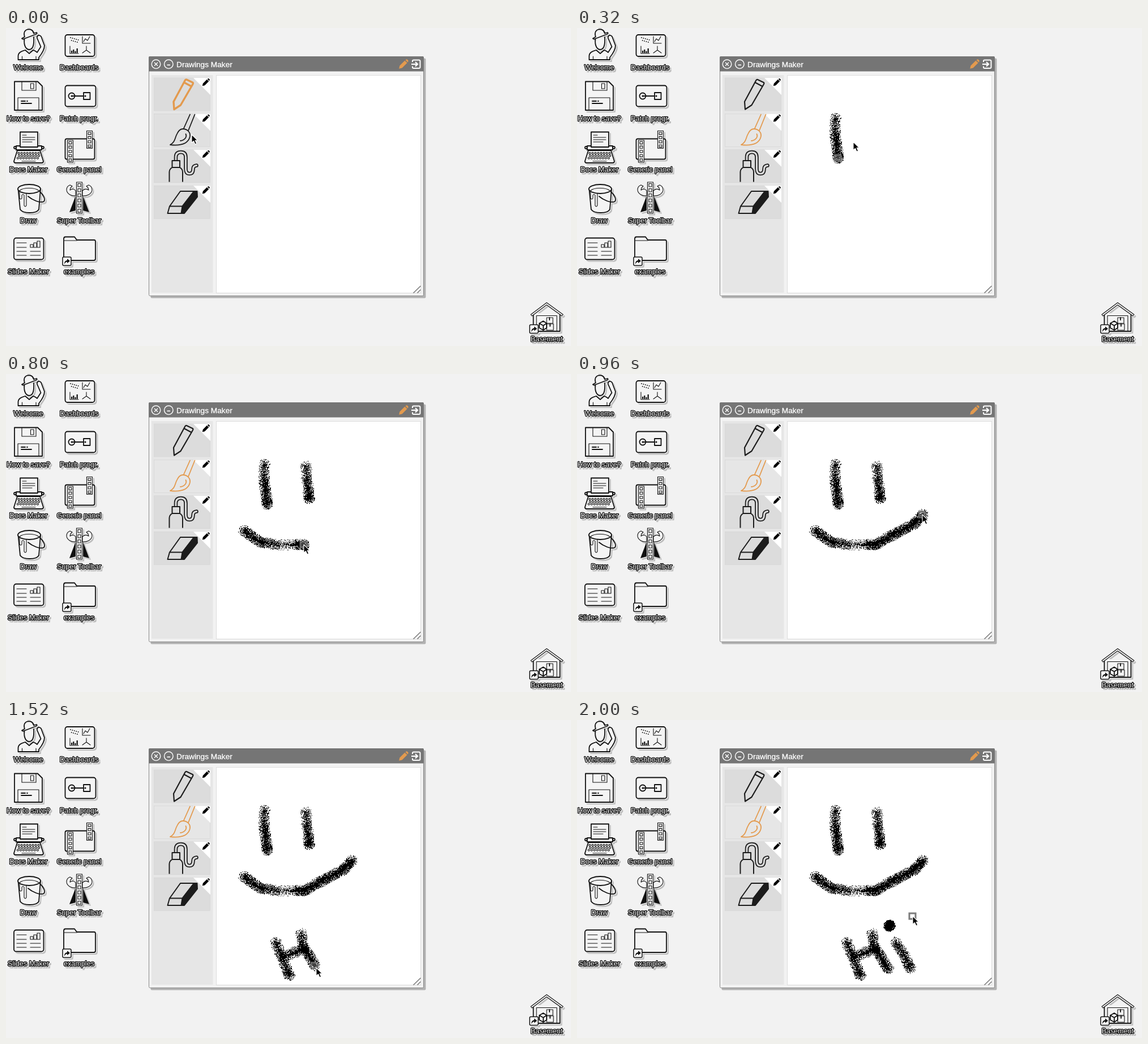
Recreate the animation shown at these times as an HTML page with a canvas. Size 998 by 561 pixels, loop 2080 ms.

```html
<!DOCTYPE html>
<html lang="en">
<head>
<meta charset="utf-8">
<title>Drawings Maker</title>
<style>
  html, body { margin: 0; width: 100%; height: 100%; overflow: hidden; background: #f2f2f2; }
  svg, canvas { position: absolute; left: 0; top: 0; width: 998px; height: 561px; }
  text { font-family: "Liberation Sans", Arial, Helvetica, sans-serif; }
  .icon { fill: none; stroke: #111; stroke-width: 1.8; stroke-linejoin: round; stroke-linecap: round;
          filter: drop-shadow(1px 1px 0 #fafafa) drop-shadow(2px 2px .5px #bdbdbd); }
  .icon .paper { fill: #f4f4f4; }
  .icon .thin { stroke-width: 1.1; }
  .icon .solid { fill: #111; stroke: none; }
  .icon text { font-size: 12.6px; text-anchor: middle; fill: #fff; stroke: #000; stroke-width: 2.4; paint-order: stroke; }
  .tool { fill: none; stroke: #1c1c1c; stroke-width: 2; stroke-linejoin: round; stroke-linecap: round; }
</style>
</head>
<body>
<svg viewBox="0 0 998 561">
  <defs>
    <g id="shortcut">
      <rect width="15" height="15" rx="2" fill="#f8f8f8" stroke="#111" stroke-width="1.5"/>
      <path fill="#111" stroke="none" d="M3 13C3 8 5 6 8 6V3L13 7L8 11V8.500C6 8.500 4 10 3 13Z"/>
    </g>
    <path id="pen" d="M-6.500 6.500L-5.500 2L2-5.500L5.500-2L-2 5.500ZM3-6.300L4.300-7.300Q5.300-7.600 6.600-6.300Q7.800-5 7-4L6.200-3Z"/>
    <path id="hose" d="M300 236V228Q300 219 309 219Q317.500 219 317.500 228V248Q317.500 257 324 257Q330.500 257 330.500 249Q330.500 243 336.500 242.500"/>
  </defs>
  <g id="desktop"></g>

  <g id="window">
    <rect x="255.500" y="53.500" width="486" height="423" rx="2" fill="#b2b2b2"/>
    <rect x="252.500" y="50.500" width="485" height="422" rx="2" fill="#f2f2f2" stroke="#8a8a8a"/>
    <path d="M252 76.500V52Q252 50 254 50H736Q738 50 738 52V76.500Z" fill="#757575"/>
    <g fill="none" stroke="#fff" stroke-width="1.400">
      <circle cx="265" cy="63.800" r="7.800"/>
      <path d="M262 60.800L268 66.800M268 60.800L262 66.800"/>
      <circle cx="287.300" cy="63.800" r="7.800"/>
      <path d="M284.500 65.300H290" stroke-width="1.700"/>
      <path d="M718 60V58.500Q718 56.500 720 56.500H729.500Q731.500 56.500 731.500 58.500V69Q731.500 71 729.500 71H720Q718 71 718 69V67.500" stroke-width="2"/>
      <path d="M716 63.800H726M723 60L727 63.800L723 67.600" stroke-width="2.200"/>
    </g>
    <use href="#pen" transform="translate(702 64) scale(1.200)" fill="#e39a4e"/>
    <text x="301" y="69" font-size="13.700" fill="#fff" stroke="#fff" stroke-width=".3">Drawings Maker</text>
    <rect x="257" y="83" width="108.500" height="384" fill="#e6e6e6"/>
    <rect x="371.500" y="83.500" width="361" height="384" fill="#fff" stroke="#dcdcdc"/>
    <path d="M719.500 467.500L732.500 455M726.500 467.500L732.500 461.500" stroke="#777" stroke-width="1.500"/>
  </g>
  <g id="tools"></g>

  <g class="tool" id="pencil">
    <path d="M319 91L329.500 96Q331 97 330 99L308.500 136L297 143.500L296 130L316.500 92Q317.500 90.500 319 91ZM314.500 96L327.500 103"/>
  </g>
  <g class="tool" id="brush" style="stroke-width:1.800">
    <path d="M325 152.500L314 177M333.500 152.500L322 181"/>
    <path d="M312 178C321 178 327 185 324.500 193C321 204 308 208 290 206C298 202 298 196 301 189C304 182 307 178 312 178ZM308 199C316 198 320 192 317.500 187"/>
  </g>
  <g class="tool">
    <use href="#hose" stroke-width="6.500"/>
    <use href="#hose" stroke="#dcdcdc" stroke-width="3"/>
    <path d="M288.500 271.500V254Q288.500 249 293.500 246V234H307V246Q312 249 312 254V271.500M293.500 246H307" fill="#dcdcdc" stroke-linecap="butt"/>
  </g>
  <g class="tool">
    <path d="M308 288H332L311.500 314.500H289ZM289 314.500L285.500 327H309.500"/>
    <path d="M332 288H337.500L338 298L315 327H309.500L311.500 314.500Z" fill="#1c1c1c"/>
  </g>
</svg>
<canvas id="ink" width="998" height="561"></canvas>
<svg viewBox="0 0 998 561">
  <rect id="marker" x="-6" y="-5" width="11" height="10" fill="rgba(255,255,255,.25)" stroke="#6e6e6e" stroke-opacity=".9" stroke-width="3"/>
  <path id="cursor" d="M0 0V14.500L3.500 11.300L6 17L8.600 15.900L6.200 10.300H10.500Z" fill="#000" stroke="#fff" stroke-width="1.100" stroke-linejoin="round"/>
</svg>
<script>
const $ = id => document.getElementById(id);
const STEP = 80, STEPS = 26;

// Static desktop
const rect = (x, y, w, h, cls = "paper", r = 0) =>
  `<rect x="${x}" y="${y}" width="${w}" height="${h}" rx="${r}" class="${cls}"/>`;
const path = (d, cls = "") => `<path d="${d}" class="${cls}"/>`;
const dot = (x, y, r, cls = "solid") => `<circle cx="${x}" cy="${y}" r="${r}" class="${cls}"/>`;
const shortcut = (x, y) => `<use href="#shortcut" x="${x}" y="${y}"/>`;
const range = (n, make) => Array.from({ length: n }, (_, i) => make(i)).join("");
const strip = (x, y, n, step) => rect(x, y, 10, n * step + 1, "paper thin") +
  range(n, i => rect(x + 2.5, y + 2.5 + i * step, 5, step - 3.5, "thin"));

function icon(label, x, y, art) {
  $("desktop").innerHTML += `<g class="icon">${art}<text x="${x}" y="${y}">${label}</text></g>`;
}

icon("Welcome", 39.5, 74,
  path("M21.500 56V49C22 43 27 41 34 39L41 45L48 39C51 40 53 41 55 43L61.500 33L55 18C54 13 59 11 62 15L68 31C68 38 62 47 58 52V56Z", "paper") +
  path("M32.500 20C31 32 36 38 41 38C47 38 50 31 49 16", "paper") +
  path("M28 18.500C29 20 31 20 32 19L53 11C55 10 55 9 54 8L49 9.500C48 3.500 43 1.500 38 2.500C32 4.500 31 9.500 33 15.500Z", "paper") +
  path("M28.500 50V56M53 50V56", "thin"));
icon("Dashboards", 129, 74,
  rect(104.5, 12, 52, 38, "paper", 4) +
  range(9, i => dot(114 + i * 1.7, 17 + (i * 5) % 9, .9)) +
  path("M135 15V27H149M137 24L140 19L144 22L148 15M113 32V45H128M142 32V39L135 44M142 39L149 44", "thin") +
  range(4, i => rect(115 + i * 3.2, 40 - [0, 2, -1, 4][i], 2.2, 4 + [0, 2, -1, 4][i], "solid")));
icon("How to save?", 39.5, 164,
  path("M15 94.500H56L64 102.500V145H15Z", "paper") +
  path("M28 95V110H53V95", "thin") + rect(43.5, 98, 5.5, 9, "thin") +
  path("M21 145V123H58V145", "thin") +
  path("M27 129H34M37 129H38M27 133H45"));
icon("Patch progr.", 129, 164,
  rect(104.5, 101.5, 54, 37, "paper", 4) + dot(116, 120, 5.5, "") + dot(116, 120, 1.5) +
  path("M117 120H137") + rect(137, 114, 11.5, 12, "") + dot(140, 120, 1.5));
icon("Docs Maker", 39.5, 254,
  path("M18 208H63V215H18Z", "paper") + dot(16, 211, 2, "") + dot(65, 211, 2, "") +
  path("M25 210V183.500H56V210Z", "paper") +
  path("M29 189H36M29 193H51M29 197H51M29 201H46", "thin") +
  path("M20 216H60L66 235Q66 238 63 238H17Q14 238 14 235Z", "paper") +
  range(3, r => range(8, i => dot(22.5 + i * 5 - r * .8 + (r === 1 ? 1.5 : 0), 221 + r * 4.3, 1.6, "thin"))) +
  path("M28 235H52", "thin"));
icon("Generic panel", 129, 254,
  rect(104.5, 195.5, 52, 36, "paper", 3) + strip(108.5, 198, 5, 7.6) + strip(142.5, 181.5, 4, 7.4));
icon("Draw", 39.5, 344,
  path("M21.500 284L25 320C30 328 54 328 58 320L61 284", "paper") +
  `<ellipse cx="41" cy="284" rx="20" ry="8" class="paper"/>` +
  path("M24 287C30 281 51 281 58 287M24 288V300Q26 304 28 300V295Q30 292 32 295V313Q34 317 36 313V292", "thin") +
  path("M60 289C66 294 70 302 67 306C61 310 46 303 39 297"));
icon("Super Toolbar", 129, 344,
  path("M123 296L112 325L123 322ZM136 296L147 325L136 322Z", "solid") +
  path("M123 296C116 297 108 293 107 286C107 281 110 278 113 277L117 279L114 282L113 286C117 283 121 284 123 287ZM135 296C143 297 151 293 152 286C152 281 149 278 146 277L142 279L145 282L146 286C142 283 138 284 135 287Z", "paper thin") +
  strip(124.5, 272, 6, 9));
icon("Slides Maker", 39.5, 434,
  rect(14, 370.5, 52.5, 38, "paper", 4) +
  path("M19 379H36M19 387H36M19 394H36M19 401H36M43 394H61M43 401H61", "thin") +
  range(3, i => rect(43 + i * 6, 382 - i * 3, 5, 5 + i * 3, "thin")));
icon("examples", 129, 434,
  path("M102 408V372Q102 368.500 105 368.500H121L125 374H156Q158 374 158 377V407Q158 410 155 410H104Q102 410 102 408Z", "paper") +
  path("M103 375H125", "thin") + shortcut(100, 404));
icon("Basement", 955, 553,
  path("M931.500 503V535H978.500V503", "paper") +
  path("M927 505.500L955 484.500L984 505.500L982 508L955 488.500L929 508Z", "paper thin") +
  path("M937 534V507.500H973V534", "thin") +
  rect(955, 511, 11, 10, "paper thin") + rect(955, 522, 12, 11, "paper thin") +
  path("M942 521L949 517L955 521V529L949 533L942 529ZM942 521L949 525L955 521M949 525V533M960 511V515M961 522V526") +
  shortcut(925, 523.5));

$("tools").innerHTML = range(4, i => {
  const y = 88 + i * 63.4;
  return `<rect id="tool${i}" x="261.500" y="${y}" width="99" height="58" fill="#dcdcdc" stroke="#d2d2d2" stroke-width=".6"/>
    <path d="M331 ${y}H361V${y + 30}Z" fill="#fff"/>
    <use href="#pen" transform="translate(353 ${y + 8}) scale(.950)"/>`;
});

// Spray strokes: points are [x, y, dots left where the hand slows down]
const strokes = [
  { from: 2, to: 3, points: [[456, 159, 130], [455, 173, 40], [456, 190, 180], [459, 211, 150], [461, 229, 320]] },
  { from: 5, to: 7, points: [[530, 162, 110], [531, 185, 130], [534, 206, 130], [535, 219, 300]] },
  { from: 9, to: 12, points: [[420, 276, 210], [449, 296, 250], [480, 301, 50], [506, 300, 40], [526, 301, 280], [560, 282, 220], [595, 264, 240], [610, 248, 280]] },
  { from: 14, to: 15, points: [[476, 392, 130], [484, 411, 110], [492, 430, 90], [500, 450, 260]] },
  { from: 16, to: 17, points: [[488, 418, 120], [526, 403, 200]] },
  { from: 18, to: 20, points: [[521, 376, 90], [524, 398, 160], [535, 415, 180], [545, 433, 180], [549, 438, 240]] },
  { from: 21, to: 22, points: [[562, 392, 120], [575, 410, 150], [582, 423, 110], [588, 437, 260]] },
  { from: 23, to: 24, points: [[551, 363, 800], [552, 362, 800]] },
];
// Cursor places away from the ink
const rests = { 0: [328, 188], 1: [397, 169], 4: [488, 201], 8: [421, 276], 13: [543, 318], 19: [548, 437], 25: [593, 346] };
const lagging = [4, 19];

let seed = 7;
const random = () => (seed = seed * 16807 % 2147483647) / 2147483647;
const dots = [], penStops = [];

function dab(x, y, count, step) {
  for (let i = 0; i < count; i++) {
    const angle = random() * 2 * Math.PI, r = random() * 10;
    dots.push([Math.round(x + r * Math.cos(angle)), Math.round(y + r * Math.sin(angle)), step]);
  }
}

for (const { from, to, points } of strokes) {
  points.forEach(([x, y, count], i) => {
    const step = Math.floor(from + (to - from) * i / (points.length - 1));
    penStops.push([x, y, step]);
    dab(x, y, count, step);
    if (!i) return;
    const [px, py, before] = points[i - 1];
    const n = Math.ceil(Math.hypot(x - px, y - py) / 4);
    for (let k = 1; k < n; k++) {
      dab(px + (x - px) * k / n, py + (y - py) * k / n, 15 + (before + count) * .25, step);
    }
  });
}

const ctx = $("ink").getContext("2d");
const place = (el, [x, y]) => el.setAttribute("transform", `translate(${x} ${y})`);
let shown = -1;

function draw(step) {
  if (step === shown) return;
  shown = step;
  ctx.clearRect(0, 0, 998, 561);
  for (const [x, y, at] of dots) if (at <= step) ctx.fillRect(x, y, 1, 1);

  const pen = penStops.filter(p => p[2] <= step).pop() || rests[0];
  const tip = rests[step] || pen;
  place($("cursor"), tip);
  place($("marker"), lagging.includes(step) ? pen : tip);
  $("marker").style.display = step > 1 ? "" : "none";

  const brushOn = step > 0;
  $("pencil").style.stroke = brushOn ? "" : "#e39a4e";
  $("pencil").style.strokeWidth = brushOn ? 2.2 : 3.4;
  $("brush").style.stroke = brushOn ? "#e39a4e" : "";
  $("tool1").setAttribute("fill", brushOn ? "#e6e6e6" : "#e0e0e0");
}

function tick() {
  draw(Math.floor(performance.now() / STEP) % STEPS);
  requestAnimationFrame(tick);
}
tick();
</script>
</body>
</html>
```
